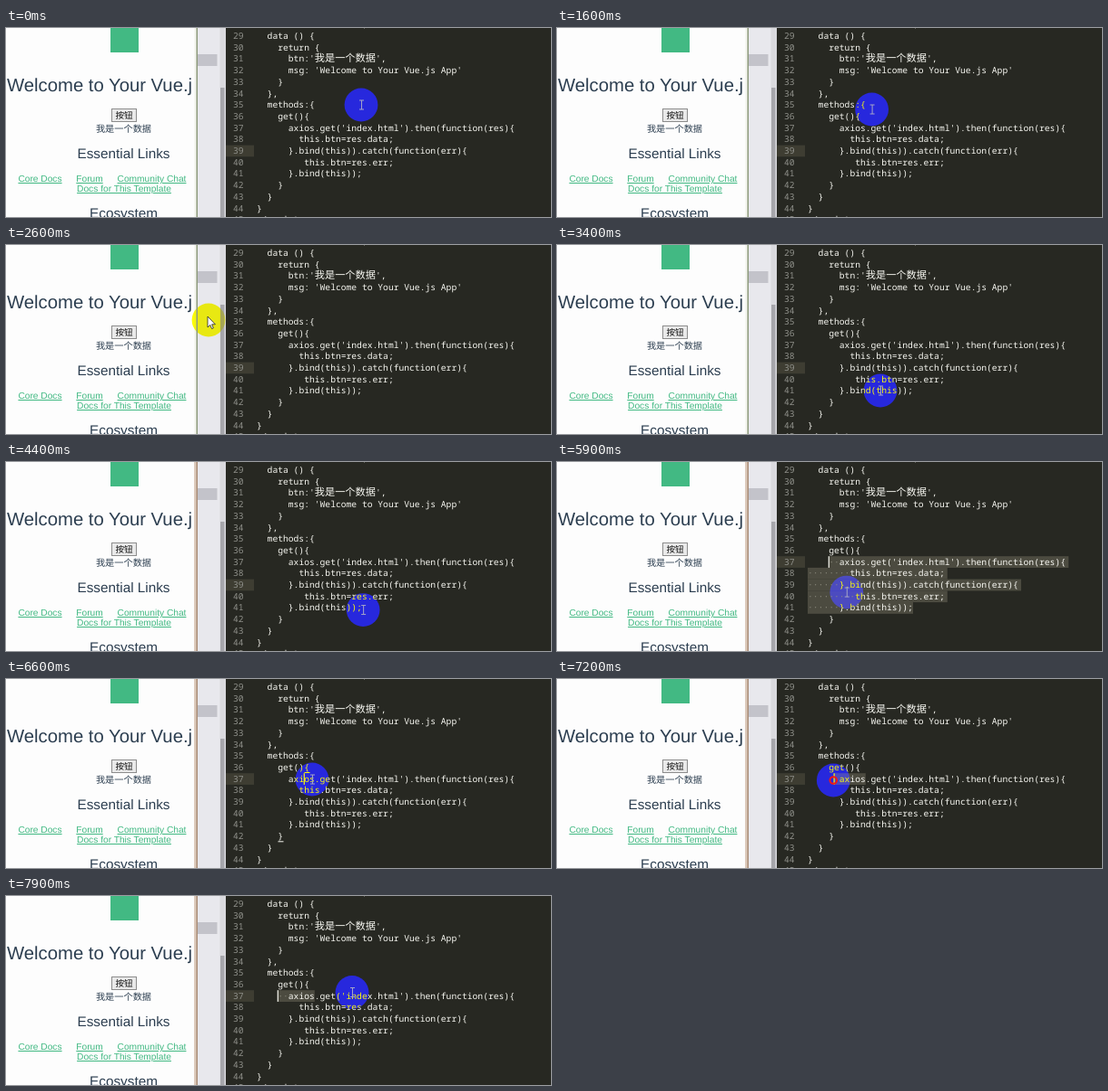
Write an HTML page that moves like this. It is 600x209 px and loops after 8 s.

```html
<!DOCTYPE html>
<html lang="en">
<head>
<meta charset="utf-8">
<title>Editor and preview</title>
<style>
  html, body { margin: 0; width: 600px; height: 209px; overflow: hidden; background: #272822; }
  svg { display: block; isolation: isolate; text-rendering: geometricPrecision; }
  text { white-space: pre; }
  .page { font-family: "Liberation Sans", "Noto Sans CJK SC", sans-serif; font-size: 10.2px; fill: #2c3e50; text-anchor: middle; }
  .page .h1 { font-size: 20.3px; text-anchor: start; }
  .page .h2 { font-size: 15.3px; }
  .page .link { fill: #42b983; text-decoration: underline; }
  .page .btn { font-size: 9.6px; fill: #111; }
  .code { font-family: "Noto Sans Mono", "DejaVu Sans Mono", monospace; font-size: 9.67px; fill: #f8f8f2; }
  .code .num { fill: #8f908a; }
  .cjk { font-family: "Noto Sans CJK SC", sans-serif; font-size: 11.2px; }
  .halo { fill: #00f; mix-blend-mode: difference; }

  /* the window frame turns tan when the editor takes the focus */
  .frame { fill: #f4f5f0; animation: frame 8s step-end infinite; }
  .edge { fill: #8d9a7c; animation: edge 8s step-end infinite; }
  @keyframes frame { 55% { fill: #dccabc; } }
  @keyframes edge { 55% { fill: #a98d78; } }
</style>
</head>
<body>
<svg width="600" height="209" viewBox="0 0 600 209">
  <rect width="600" height="209" fill="#272822"/>
  <rect width="207" height="209" fill="#fdfdfd"/>
  <g class="page">
    <rect x="115" y="-4" width="31" height="31" fill="#42b983"/>
    <text class="h1" x="1" y="70">Welcome to Your Vue.j</text>
    <rect x="116.5" y="89.5" width="27" height="14" fill="#e9e9e9" stroke="#8c8c8c"/>
    <text class="btn" x="130" y="100.3">按钮</text>
    <text x="129.5" y="115">我是一个数据</text>
    <text class="h2" x="129.5" y="144">Essential Links</text>
    <text class="link" x="37.5" y="170">Core Docs</text>
    <text class="link" x="92" y="170">Forum</text>
    <text class="link" x="160.5" y="170">Community Chat</text>
    <text class="link" x="130" y="181">Docs for This Template</text>
    <text class="h2" x="129.5" y="210">Ecosystem</text>
  </g>
  <rect class="frame" x="207" width="3" height="209"/>
  <rect class="edge" x="209.5" width="1.5" height="209"/>
  <rect x="211" width="31" height="209" fill="#e8e8ed"/>
  <rect x="211" y="29" width="21.5" height="13" fill="#c3c3ca"/>
  <rect x="235.5" width="6.5" height="209" fill="#dadade"/>
  <rect x="236" y="66" width="4.5" height="143" fill="#a6a6ab"/>

  <rect id="row" x="242" width="31" height="12.7" fill="#3e3d32"/>
  <g id="sel" class="code"></g>
  <g id="lines" class="code"></g>
  <path id="pair" d="M328.5 103.5h6M299.5 179.8h6" stroke="#f8f8f2"/>
  <rect id="caret" width="1.2" height="12.7" fill="#f8f8f0"/>

  <circle id="halo" class="halo" r="18.4"/>
  <g id="mouse">
    <path id="beam" d="M-2 -5H3M.5 -5V5M-2 5H3" fill="none" stroke="#a4a4c8"/>
    <path id="arrow" d="M-1 -4V8L1.8 5.4L3.6 9.6L5.4 8.8L3.6 4.8H7.4z" fill="#fff" stroke="#222" stroke-width=".8"/>
    <circle id="press" r="3.8" fill="none" stroke="#f01818" stroke-width="2"/>
  </g>
</svg>
<script>
const LOOP = 8000, STEP = 100, FIRST = 28;
const LEFT = 276, TOP = -10.1, CHAR = 5.8, ROW = 12.7, BASE = 9.4;
const code = [
  "  name: 'HelloWorld',",
  "  data () {",
  "    return {",
  "      btn:'我是一个数据',",
  "      msg: 'Welcome to Your Vue.js App'",
  "    }",
  "  },",
  "  methods:{",
  "    get(){",
  "      axios.get('index.html').then(function(res){",
  "        this.btn=res.data;",
  "      }.bind(this)).catch(function(err){",
  "         this.btn=res.err;",
  "      }.bind(this));",
  "    }",
  "  }",
  "}",
  "</script" + ">"
];
const START_ROW = 11;

// each move ends at a time and place; sag bows it downwards
const move = (end, x, y, sag = 0) => ({ end, x, y, sag });
const moves = [
  move(700, 391, 85),
  move(1600, 346.6, 90, 18),
  move(2500, 149, 97, 10),
  move(2600, 223, 83),
  move(3400, 356, 161, -90),
  move(4500, 394, 163, 8),
  move(5100, 298, 124),
  move(5300, 300, 111),
  move(6300, 329, 111, 37),
  move(6600, 337, 111),
  move(6800, 341, 112),
  move(7300, 300, 112),
  move(7900, 381, 106.5, 14)
];
const drag = { from: 4500, to: 5400 };
const click = { from: 6300, to: 6500 };
const pick = { from: 6800, to: 7400 };

const $ = id => document.getElementById(id);
const show = (id, on) => $(id).style.display = on ? "" : "none";
const rowY = r => TOP + r * ROW;
const colX = c => LEFT + c * CHAR;
const indent = s => s.search(/\S/);
const ease = k => k * k * (3 - 2 * k);

function pointer(t) {
  const i = moves.findIndex(m => m.end >= t);
  if (i < 1) return i ? moves[moves.length - 1] : moves[0];
  const a = moves[i - 1], b = moves[i];
  const k = ease((t - a.end) / (b.end - a.end));
  return {
    x: a.x + (b.x - a.x) * k,
    y: a.y + (b.y - a.y) * k + b.sag * Math.sin(Math.PI * k)
  };
}

function cell(t) {
  const { x, y } = pointer(t);
  const r = Math.floor((y - TOP) / ROW);
  const c = Math.round((x - LEFT) / CHAR);
  return { r, c: Math.max(0, Math.min(c, code[r].length)) };
}

// highlight from the caret (a) forward to the anchor (b)
function selection(a, b) {
  let out = "";
  for (let r = a.r; r <= b.r; r++) {
    const from = r === a.r ? a.c : 0;
    const to = r === b.r ? b.c : code[r].length;
    const w = (to - from) * CHAR + (r < b.r ? 3 : 0);
    if (w <= 0) continue;
    out += `<rect x="${colX(from)}" y="${rowY(r)}" width="${w}" height="${ROW + .1}" fill="#4c4b40"/>`;
    const dots = Math.min(indent(code[r]), to) - from;
    if (dots > 0) out += `<text x="${colX(from)}" y="${rowY(r) + BASE}" fill="#8f8e80">${"·".repeat(dots)}</text>`;
  }
  return out;
}

function draw(t) {
  const p = pointer(t);
  const last = [pick, click, drag].find(q => q.from <= t);
  const held = last && t < last.to;
  const caret = last ? cell(Math.min(t, last.to - STEP)) : { r: START_ROW, c: 0 };

  $("sel").innerHTML = last && last !== click ? selection(caret, cell(last.from)) : "";
  $("row").setAttribute("y", rowY(caret.r));
  $("caret").setAttribute("x", colX(caret.c) - .5);
  $("caret").setAttribute("y", rowY(caret.r));
  show("caret", last);
  show("pair", last === click);

  const at = `translate(${p.x} ${p.y})`;
  $("halo").setAttribute("transform", at);
  $("mouse").setAttribute("transform", at);
  show("press", held);
  show("beam", !held && p.x >= LEFT);
  show("arrow", !held && p.x < LEFT);
}

$("lines").innerHTML = code.map((s, i) => {
  const y = rowY(i) + BASE, n = indent(s);
  const body = s.slice(n).replace(/</g, "&lt;").replace(/[一-龥]+/, m => `<tspan class="cjk">${m}</tspan>`);
  return `<text class="num" x="250" y="${y}">${FIRST + i}</text><text x="${colX(n)}" y="${y}">${body}</text>`;
}).join("");

let shown = -1;
function tick() {
  const t = Math.floor(performance.now() % LOOP / STEP) * STEP;
  if (t !== shown) draw(shown = t);
  requestAnimationFrame(tick);
}
tick();
</script>
</body>
</html>
```
